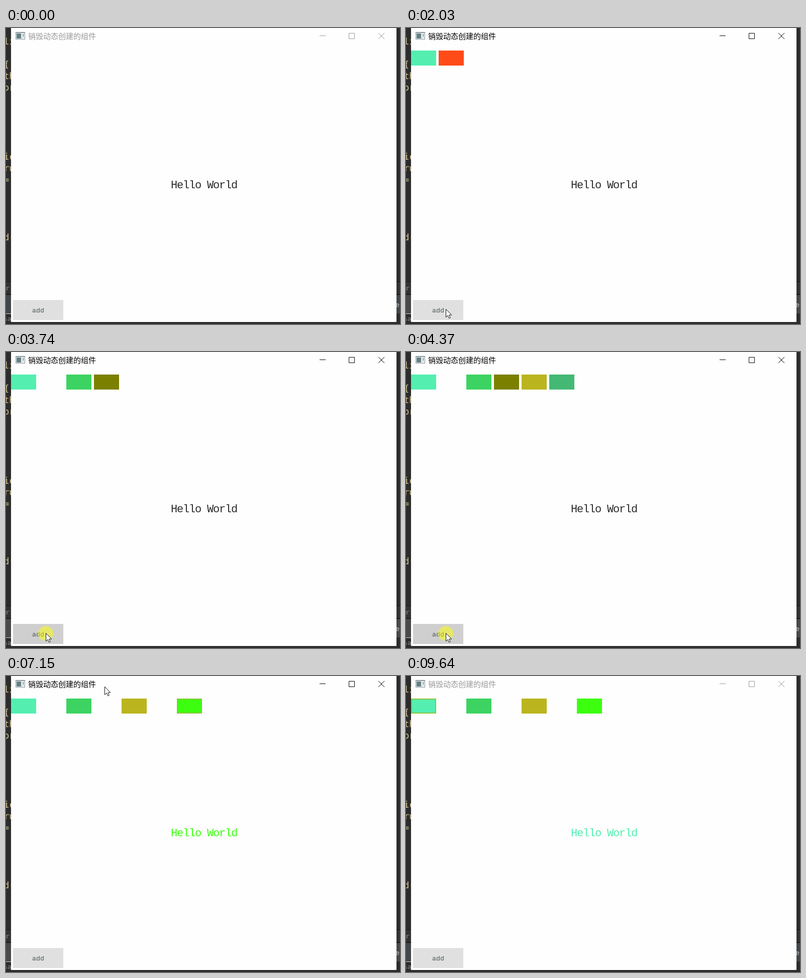
These frames come from a looping animation (784x591 px, 9.79 s). An HTML page with a canvas:

```html
<!DOCTYPE html>
<html lang="zh">
<head>
<meta charset="utf-8">
<style>
html, body { margin: 0; width: 100%; height: 100%; overflow: hidden; background: #2c2c2c; }
canvas { display: block; }
</style>
</head>
<body>
<canvas id="stage" width="784" height="591"></canvas>
<script>
const ctx = document.getElementById('stage').getContext('2d');
const LOOP = 9790, TRAVEL = 450, CLICK = 100, LIFETIME = 1000;
const MONO = '"Liberation Mono", monospace';
const CODE = '"DejaVu Sans Mono", monospace';
const TITLE = '"Noto Sans CJK SC", "Noto Sans CJK", sans-serif';

const code = 'li,,{,th,or,,,,,,ic,ru,=,,,,,d('.split(',');
const colors = ['#54efb0', '#ff4b18', '#3dd362', '#7c8000', '#bab51e', '#43b974', '#3bff0f'];
// Three slow clicks, then a quick steady series
const addedAt = i => i < 3 ? [870, 2030, 2980][i] : 3510 + 340 * (i - 3);

// Pointer stops: departure time towards the stop, x, y
const stops = [
  [0, 608, 592], [180, 79, 561], [4800, 79, 527], [5380, 262, 68],
  [6300, 362, 62], [6860, 130, 4], [7340, 35, 58], [7860, 141, 317], [8400, 608, 592]
];
// A stop on the block row clicks the block under it
const picks = stops.filter(([, , y]) => y > 45 && y < 75)
  .map(([start, x]) => ({ at: start + TRAVEL, index: Math.floor((x - 10) / 55) }));

const within = (t, from, to) => t >= from && t < to;

function rect(x, y, w, h, color) {
  ctx.fillStyle = color;
  ctx.fillRect(x, y, w, h);
}

function text(str, x, y, font, color, spacing = 0) {
  ctx.font = font;
  ctx.letterSpacing = spacing + 'px';
  ctx.fillStyle = color;
  ctx.fillText(str, x, y);
}

function pointerAt(t) {
  const i = Math.max(1, stops.findLastIndex(([start]) => t >= start));
  const [start, x, y] = stops[i], [, x0, y0] = stops[i - 1];
  const k = Math.min(1, Math.max(0, (t - start) / TRAVEL));
  const e = k * k * (3 - 2 * k);
  return [x0 + (x - x0) * e, y0 + (y - y0) * e];
}

// The button is held for the middle part of each interval between blocks
function isPressed(t) {
  return colors.some((_, i) => {
    const end = addedAt(i), start = i ? addedAt(i - 1) : 500;
    return within((t - start) / (end - start), 0.32, 0.85);
  });
}

function drawEditor(active) {
  rect(0, 0, 784, 591, '#2c2c2c');
  code.forEach((str, i) => text(str, -4, 33 + 23 * i, '17px ' + CODE, '#d6c795'));
  for (const x of [0, 777]) {
    rect(x, 506, 10, 1, '#151515');
    rect(x, 507, 10, 24, '#333333');
    rect(x, 531, 10, 2, '#1b1b1b');
    rect(x, 533, 10, 37, active ? '#494949' : '#42474a');
  }
  rect(0, 570, 10, 1, '#d8d8d8');
  text('r', -1, 524, '13px ' + CODE, '#8f8f8f');
  text('sa', -5, 585, '13px ' + CODE, '#8f8f8f');
  text('e', 775, 557, '13px ' + CODE, '#d0d0d0');
}

function drawWindow(active) {
  rect(10, 0, 767, 587, '#fefefe');

  rect(19, 8, 19, 15, '#8b969b');
  rect(20, 10, 17, 12, '#f1f5f6');
  rect(21, 11, 9, 10, '#647f84');
  rect(31, 11, 5, 10, '#dce6ea');
  rect(34, 12, 1, 5, '#637278');

  const ink = active ? '#000' : '#999';
  text('销毁动态创建的组件', 44, 22, '15px ' + TITLE, ink);
  ctx.strokeStyle = ink;
  ctx.lineWidth = 1;
  ctx.beginPath();
  ctx.moveTo(624, 15.5); ctx.lineTo(636, 15.5);
  ctx.rect(682.5, 10.5, 11, 11);
  ctx.moveTo(741, 10); ctx.lineTo(753, 22);
  ctx.moveTo(753, 10); ctx.lineTo(741, 22);
  ctx.stroke();
}

// Every second block destroys itself after its lifetime
function drawBlocks(t, selected) {
  colors.forEach((color, i) => {
    const start = addedAt(i), end = i % 2 ? start + LIFETIME : LOOP;
    if (!within(t, start, end)) return;
    const x = 10 + 55 * i;
    rect(x, 45, 50, 30, color);
    if (i !== selected) return;
    ctx.strokeStyle = '#8cc63f';
    ctx.lineWidth = 2;
    ctx.strokeRect(x + 1, 46, 48, 28);
  });
}

function drawPointer([x, y], clicking) {
  if (clicking) {
    ctx.fillStyle = 'rgba(255, 255, 0, 0.5)';
    ctx.beginPath();
    ctx.arc(x, y + 1, 15, 0, 2 * Math.PI);
    ctx.fill();
  }
  ctx.save();
  ctx.translate(Math.round(x) + 0.5, Math.round(y) + 0.5);
  const arrow = new Path2D('M0 0V16L3.7 12.5L6.2 18.2L8.8 17L6.3 11.5H11.3Z');
  ctx.fillStyle = '#fff';
  ctx.strokeStyle = '#111';
  ctx.lineWidth = 1;
  ctx.fill(arrow);
  ctx.stroke(arrow);
  ctx.restore();
}

function draw(t) {
  const active = within(t, 160, 9640);
  const pressed = isPressed(t);
  const picking = picks.some(({ at }) => within(t, at, at + CLICK));
  const pick = picks.findLast(({ at }) => t >= at + CLICK);

  drawEditor(active);
  drawWindow(active);
  drawBlocks(t, pick?.index);
  text('Hello World', 328, 320, '22px ' + MONO, pick ? colors[pick.index] : '#2a2a2a', -1.2);
  rect(14, 543, 100, 40, pressed ? '#cfcfcf' : '#e0e0e0');
  text('add', 52, 568, '13.33px ' + MONO, '#4a5654');
  drawPointer(pointerAt(t), pressed || picking);
}

function tick() {
  draw(performance.now() % LOOP);
  requestAnimationFrame(tick);
}
tick();
</script>
</body>
</html>
```
